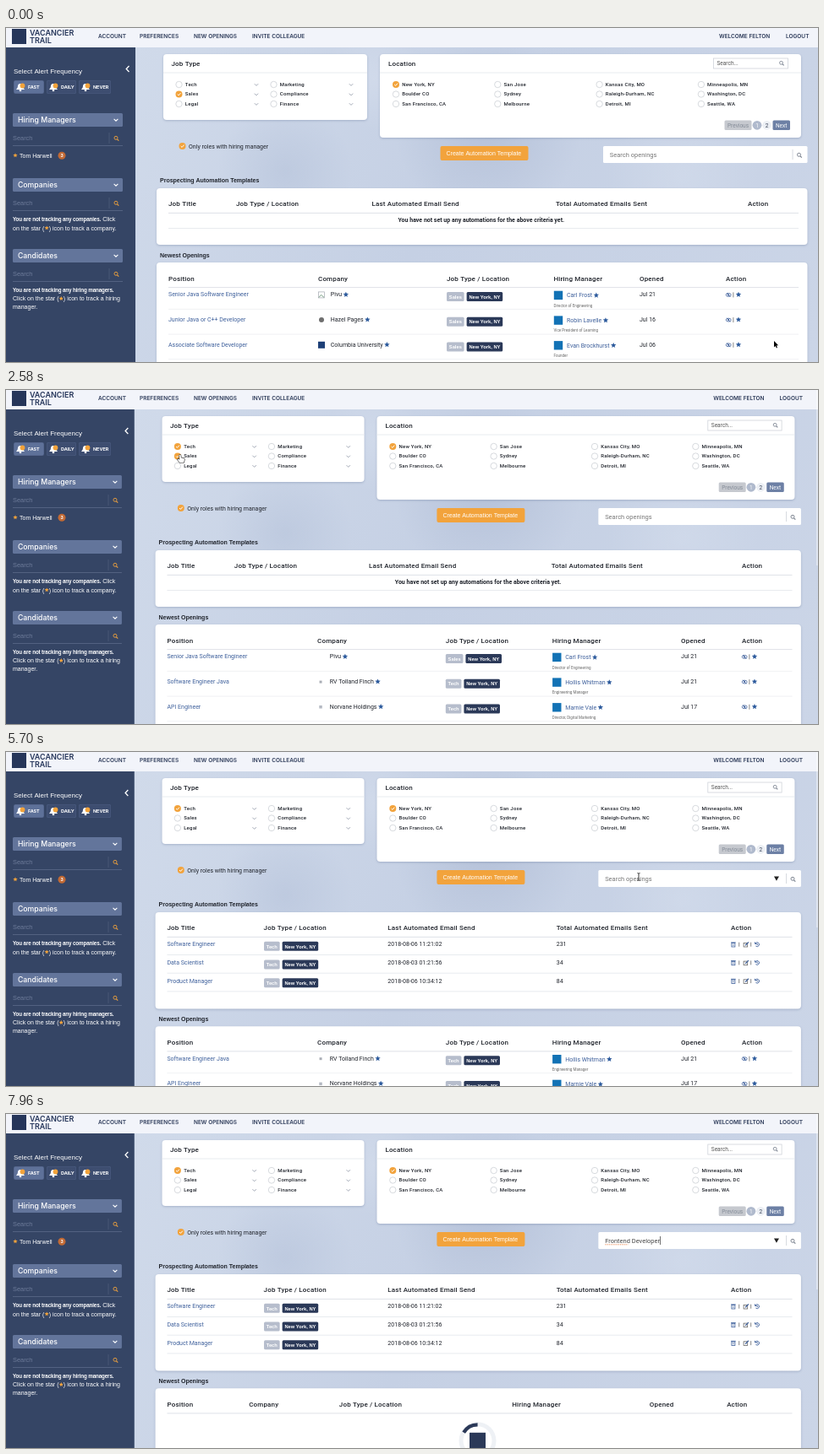
Write an HTML page with a canvas that moves like this. It is 960 px wide and 396 px high and loops after 8 s.

```html
<!DOCTYPE html>
<html lang="en">
<head>
<meta charset="utf-8">
<title>Openings dashboard</title>
<style>
html, body { margin: 0; width: 100%; height: 100%; overflow: hidden; background: #c8d3e6; }
canvas { display: block; width: 100vw; height: 100vh; }
</style>
</head>
<body>
<canvas id="stage"></canvas>
<script>
const W = 960, H = 396, LOOP = 8000;
const canvas = document.getElementById('stage');
const ctx = canvas.getContext('2d');

const NAVY = '#2b3958', LINK = '#3d5f9b', STAR = '#2c5a9c', ORANGE = '#f2a33c', INK = '#20242c', RULE = '#e3e6eb';
const ROBOTO = 'Roboto, sans-serif', ARIAL = '"Liberation Sans", Arial, sans-serif', INTER = 'Inter, sans-serif';
const F = {
  nav: `600 6.5px ${INTER}`, brand: `600 9px ${INTER}`, bar: `500 8.7px ${INTER}`, alert: `700 5.4px ${INTER}`,
  side: `7px ${ARIAL}`, sideBold: `bold 6.3px ${ARIAL}`, sideTitle: `8px ${ARIAL}`, sideSearch: `7.4px ${ARIAL}`,
  section: `bold 7px ${ARIAL}`, badge: `bold 5.75px ${ARIAL}`, button: `7px ${ARIAL}`,
  head: `500 8px ${ROBOTO}`, cell: `7px ${ROBOTO}`, bold: `700 7px ${ROBOTO}`, option: `500 6px ${ROBOTO}`,
  small: `4.5px ${ROBOTO}`, input: `7.5px ${ROBOTO}`, page: `6.5px ${ROBOTO}`, list: `700 6.7px ${INTER}`
};
const SPACING = { head: 0.17, option: 0.2, sideBold: -0.15 };

// Times of the hard changes, in ms
const AT = {
  press: 1880, tech: 2040, load1: 2150, rows1: 2370, noSales: 2690, load2: 2800, rows2: 3010,
  hover: 5250, focus: 5900, keyF: 6620, keyR: 6740, pick: 7320
};

const OPENINGS = {
  pivu: ['Senior Java Software Engineer', 'Pivu', 'Sales', 'Carl Frost', 'Director of Engineering', 'Jul 21'],
  pages: ['Junior Java or C++ Developer', 'Hazel Pages', 'Sales', 'Robin Lavelle', 'Vice President of Learning', 'Jul 16'],
  columbia: ['Associate Software Developer', 'Columbia University', 'Sales', 'Evan Brockhurst', 'Founder', 'Jul 06'],
  finch: ['Software Engineer Java', 'RV Tolland Finch', 'Tech', 'Hollis Whitman', 'Engineering Manager', 'Jul 21'],
  norvane: ['API Engineer', 'Norvane Holdings', 'Tech', 'Marnie Vale', 'Director, Digital Marketing', 'Jul 17']
};
const MARKS = { pages: [4, 6, '#6e6e6e', true], columbia: [4, 8, '#1d3f77'], finch: [4, 3, '#a9adb5'], norvane: [4, 3.5, '#b4b9c2'] };
const TEMPLATES = [
  ['Software Engineer', '2018-08-06 11:21:02', '231'],
  ['Data Scientist', '2018-08-03 01:21:56', '34'],
  ['Product Manager', '2018-08-06 10:34:12', '84']
];

let scale = 1;
const X = x => x * scale;

function text(s, x, y, font, color = INK) {
  ctx.font = F[font];
  ctx.letterSpacing = (SPACING[font] || 0) + 'px';
  ctx.fillStyle = color;
  ctx.fillText(s, x, y);
  return x + ctx.measureText(s).width;
}
function box(x, y, w, h, color, r = 0) {
  ctx.fillStyle = color;
  ctx.beginPath();
  ctx.roundRect(x, y, w, h, r);
  ctx.fill();
}
function disc(x, y, r, color) {
  ctx.fillStyle = color;
  ctx.beginPath();
  ctx.arc(x, y, r, 0, 7);
  ctx.fill();
}
function path(points, color, width = 1) {
  ctx.strokeStyle = color;
  ctx.lineWidth = width;
  ctx.beginPath();
  points.forEach(([x, y], i) => i ? ctx.lineTo(x, y) : ctx.moveTo(x, y));
  ctx.stroke();
}
function ring(x, y, r, color, width = 1, from = 0, to = Math.PI * 2) {
  ctx.strokeStyle = color;
  ctx.lineWidth = width;
  ctx.beginPath();
  ctx.arc(x, y, r, from, to);
  ctx.stroke();
}
function rule(x1, x2, y, color = RULE) { path([[x1, y], [x2, y]], color, 0.8); }
function chevron(x, y, color, s = 2.2, w = 0.9) { path([[x - s, y - s / 2], [x, y + s / 2], [x + s, y - s / 2]], color, w); }
function lens(x, y, color, r = 2) {
  ring(x - 0.5, y - 0.5, r, color, 0.9);
  path([[x + r * 0.5, y + r * 0.5], [x + r * 1.4, y + r * 1.4]], color, 1.1);
}
function star(x, y, r, color) {
  ctx.fillStyle = color;
  ctx.beginPath();
  for (let i = 0; i < 10; i++) {
    const a = -Math.PI / 2 + i * Math.PI / 5, d = i % 2 ? r * 0.45 : r;
    ctx.lineTo(x + d * Math.cos(a), y + d * Math.sin(a));
  }
  ctx.fill();
}
function card(x1, y1, x2, y2) {
  ctx.save();
  ctx.shadowColor = 'rgba(60,80,120,.28)';
  ctx.shadowBlur = 3;
  ctx.shadowOffsetY = 1;
  box(X(x1), y1, X(x2) - X(x1), y2 - y1, '#fff', 4);
  ctx.restore();
}
function check(x, y, state) {
  if (state === 'on') {
    disc(x, y, 4, ORANGE);
    path([[x - 1.8, y], [x - 0.4, y + 1.4], [x + 2, y - 1.4]], '#fff', 1);
  } else {
    disc(x, y, 3.7, state === 'down' ? '#d3d3d3' : '#fff');
    ring(x, y, 3.7, '#c6cad0', 0.7);
  }
}
function badge(s, x, y, color) {
  ctx.font = F.badge;
  ctx.letterSpacing = '0px';
  const w = ctx.measureText(s).width + 5.6;
  box(x, y, w, 11, color, 1.5);
  text(s, x + 2.8, y + 7.7, 'badge', '#fff');
  return x + w;
}
function badges(kind, x, y) { badge('New York, NY', badge(kind, x, y, '#b6bdcc') + 3, y, NAVY); }

function background() {
  const g = ctx.createLinearGradient(150, 20, 960, 396);
  g.addColorStop(0, '#d0daea');
  g.addColorStop(0.45, '#c5d0e4');
  g.addColorStop(1, '#cbd5e7');
  ctx.fillStyle = g;
  ctx.fillRect(0, 0, W, H);
  const blobs = [[570, 120, 110, '150,165,195'], [330, 170, 80, '165,180,208'], [435, 60, 60, '225,232,243'], [800, 175, 90, '222,230,242']];
  for (const [x, y, r, c] of blobs) {
    const b = ctx.createRadialGradient(x, y, 0, x, y, r);
    b.addColorStop(0, `rgba(${c},.32)`);
    b.addColorStop(1, `rgba(${c},0)`);
    ctx.fillStyle = b;
    ctx.fillRect(x - r, y - r, 2 * r, 2 * r);
  }
}

function header() {
  box(0, 0, W, 23, '#f2f4fa');
  box(7, 1, 17, 18, '#26365a');
  text('VACANCIER', 28, 9.4, 'brand', '#26365a');
  text('TRAIL', 28, 18, 'brand', '#26365a');
  [['ACCOUNT', 109], ['PREFERENCES', 158], ['NEW OPENINGS', 222], ['INVITE COLLEAGUE', 291]].forEach(([s, x]) => text(s, x, 12, 'nav', NAVY));
  text('WELCOME FELTON', X(843), 12, 'nav', NAVY);
  text('LOGOUT', X(922), 12, 'nav', NAVY);
}

function bell(x, y) {
  ctx.fillStyle = '#fff';
  ctx.beginPath();
  ctx.moveTo(x - 5, y + 3);
  ctx.quadraticCurveTo(x - 3, y + 1, x - 3, y - 1);
  ctx.arc(x, y - 1, 3, Math.PI, 0);
  ctx.quadraticCurveTo(x + 3, y + 1, x + 5, y + 3);
  ctx.fill();
  disc(x, y + 4, 1.3, '#fff');
  disc(x + 2.5, y - 1.5, 2.9, ORANGE);
}

function filterGroup(title, y) {
  box(8, y, X(138) - 8, 16, '#63759b', 1.5);
  text(title, 14, y + 11.2, 'bar', '#fff');
  chevron(X(130), y + 8, '#fff', 2.4, 1.1);
  text('Search', 8, y + 32, 'sideSearch', '#6e7c9a');
  path([[X(122), y + 23], [X(122), y + 36]], '#52617f', 0.7);
  lens(X(130.5), y + 29.8, ORANGE, 2);
  rule(8, X(138), y + 38.5, '#5b6a88');
}

function starNote(before, after, y) {
  const x = text(before, 8, y, 'side', '#fff');
  star(x + 2.8, y - 2.4, 2.7, ORANGE);
  text(after, x + 5.4, y, 'side', '#fff');
}

function sidebar() {
  box(0, 23, X(153), H, '#354565');
  text('Select Alert Frequency', 9, 53.5, 'sideTitle', '#fff');
  path([[X(145.5), 45], [X(142.2), 48.5], [X(145.5), 52]], '#fff', 1.3);
  [['FAST', 9, 36, '#5e7199'], ['DAILY', 48, 35, '#3d4d70'], ['NEVER', 86, 38, '#3d4d70']].forEach(([s, x, w, c]) => {
    box(x, 62, w, 16, '#4c5d82', 2);
    box(x + 0.5, 62.5, w - 1, 15, c, 2);
    bell(x + 8, 70);
    text(s, x + 17, 72, 'alert', '#fff');
  });
  filterGroup('Hiring Managers', 101);
  star(11, 151, 2.8, ORANGE);
  text('Tom Harwell', 16, 153.5, 'side', '#fff');
  disc(66, 151.3, 4.5, '#c26a35');
  text('3', 64.5, 153.4, 'badge', '#fff');

  filterGroup('Companies', 178);
  const x = text('You are not tracking any companies.', 8, 229.3, 'sideBold', '#fff');
  text('Click', x + 2, 229.3, 'side', '#fff');
  starNote('on the star (', ') icon to track a company.', 239.5);

  filterGroup('Candidates', 262);
  text('You are not tracking any hiring managers.', 8, 313, 'sideBold', '#fff');
  starNote('Click on the star (', ') icon to track a hiring', 323.2);
  text('manager.', 8, 333, 'side', '#fff');
}

function jobTypes(t) {
  card(186, 31, 427, 109);
  text('Job Type', X(195.5), 44.8, 'head');
  rule(X(186), X(427), 53);
  const tech = t >= AT.tech ? 'on' : t >= AT.press ? 'down' : 'off';
  const sales = t < AT.noSales ? 'on' : 'off';
  const cols = [[204.5, [['Tech', tech], ['Sales', sales], ['Legal', 'off']]], [316.5, [['Marketing'], ['Compliance'], ['Finance']]]];
  for (const [x, items] of cols) items.forEach(([s, state], i) => {
    const y = 67 + i * 11.5;
    check(X(x), y, state);
    text(s, X(x) + 7.3, y + 1.9, 'option');
    chevron(X(x + 91.5), y + 0.3, '#8d96a5', 2.2, 0.8);
  });
}

function locations() {
  card(442, 31, 940, 130);
  text('Location', X(452), 44.8, 'head');
  rule(X(442), X(940), 53);
  ctx.strokeStyle = '#cfd3da';
  ctx.lineWidth = 0.8;
  ctx.strokeRect(X(836.5), 36, X(924.5) - X(836.5), 12);
  text('Search...', X(840.5), 44.3, 'page', '#555');
  lens(X(917), 41.8, '#7e8694', 1.9);
  const cities = ['New York, NY', 'Boulder CO', 'San Francisco, CA', 'San Jose', 'Sydney', 'Melbourne',
    'Kansas City, MO', 'Raleigh-Durham, NC', 'Detroit, MI', 'Minneapolis, MN', 'Washington, DC', 'Seattle, WA'];
  cities.forEach((s, i) => {
    const x = X(461 + Math.floor(i / 3) * 120.3), y = 67 + (i % 3) * 11.5;
    check(x, y, i ? 'off' : 'on');
    text(s, x + 7.2, y + 1.9, 'option');
  });
  box(X(849.5), 109.5, 32, 11.5, '#c6c9cf', 1.5);
  text('Previous', X(849.5) + 3.5, 117.6, 'page', '#858c98');
  disc(X(888), 115.3, 5.4, '#b0bacd');
  text('1', X(888) - 1.8, 117.6, 'page', '#fff');
  disc(X(899.5), 115.3, 5.2, '#eceff4');
  text('2', X(899.5) - 1.8, 117.6, 'page', '#3d475c');
  box(X(906.5), 109.5, 20.5, 11.5, '#6d80a5', 1.5);
  text('Next', X(906.5) + 3.4, 117.6, 'page', '#fff');
}

function toolbar(t) {
  check(X(208.5), 140, 'on');
  text('Only roles with hiring manager', X(216), 142.8, 'cell');
  box(X(513.5), 140, 104, 17, ORANGE, 2);
  text('Create Automation Template', X(513.5) + 7, 151, 'button', '#fff');

  const x = X(706), right = X(947.5), typed = t >= AT.pick ? 'Frontend Developer' : t >= AT.keyR ? 'Fr' : t >= AT.keyF ? 'F' : '';
  box(x, 140, right - x, 20, '#fff', 1.5);
  const end = text(typed || 'Search openings', x + 7.8, 152.6, 'input', typed ? '#474747' : '#777');
  path([[X(930), 144], [X(930), 156]], '#ccd1d9', 0.8);
  lens(X(938), 150.8, '#737b88', 2);
  if (t >= AT.hover) {
    const a = X(918.3);
    ctx.fillStyle = '#222';
    ctx.beginPath();
    ctx.moveTo(a - 3, 147.4);
    ctx.lineTo(a + 3, 147.4);
    ctx.lineTo(a, 152.8);
    ctx.fill();
  }
  const blink = Math.floor((t - AT.focus) / 530) % 2 === 0;
  if (typed || (t >= AT.focus && blink)) {
    const c = typed ? end + 0.5 : x + 7.5;
    path([[c, 145], [c, 155]], '#333', 0.7);
  }
  if (t >= AT.pick) {
    ctx.setLineDash([1.2, 1]);
    path([[x + 8, 154.8], [x + 35, 154.8]], '#e98a55', 1);
    ctx.setLineDash([]);
  }
}

function suggestions() {
  box(701.5, 159.5, 222, 13.5, '#555c66');
  box(702.3, 160.2, 220.4, 12, '#fff');
  text('Frontend Developer', 707, 168.4, 'list', '#000');
}

function heads(names, xs, y) {
  names.forEach((s, i) => text(s, X(xs[i]), y, 'head'));
  rule(X(192), X(937), y + 8, '#d6dae1');
}

function eye(x, y) {
  ctx.strokeStyle = LINK;
  ctx.lineWidth = 0.8;
  ctx.beginPath();
  ctx.ellipse(x, y, 3, 1.9, 0, 0, 7);
  ctx.stroke();
  disc(x, y, 1, LINK);
  path([[x - 2, y - 2.4], [x + 2, y + 2.4]], LINK, 0.8);
}
function templateActions(x, y) {
  ctx.strokeStyle = LINK;
  ctx.lineWidth = 0.8;
  ctx.strokeRect(x + 0.8, y - 1.6, 4, 4.4);
  path([[x, y - 2.3], [x + 5.6, y - 2.3]], LINK, 0.9);
  path([[x + 2.8, y - 0.6], [x + 2.8, y + 1.8]], LINK, 0.7);
  path([[x + 9.6, y - 2.5], [x + 9.6, y + 2.5]], '#555', 0.7);
  ctx.strokeRect(x + 15, y - 1.8, 4.6, 4.6);
  path([[x + 17, y + 1], [x + 20.8, y - 2.8]], LINK, 1.3);
  path([[x + 23.6, y - 2.5], [x + 23.6, y + 2.5]], '#555', 0.7);
  ring(x + 31, y, 2.4, LINK, 0.9, -2.6, 2.4);
  path([[x + 28.2, y - 2.8], [x + 28.6, y - 0.6], [x + 30.8, y - 1]], LINK, 0.9);
  path([[x + 31, y - 1.2], [x + 31, y + 0.4], [x + 32.2, y + 0.4]], LINK, 0.7);
}

function templates(filled) {
  text('Prospecting Automation Templates', X(182), 183.4, 'section');
  card(178, 190, 947.5, filled ? 304.5 : 257);
  const names = ['Job Title', 'Job Type / Location', 'Last Automated Email Send', 'Total Automated Emails Sent', 'Action'];
  heads(names, filled ? [192, 307, 455, 656, 864] : [192, 272, 432.5, 650, 877], 211.4);
  if (!filled) {
    text('You have not set up any automations for the above criteria yet.', X(463.5), 230.3, 'bold');
    rule(X(192), X(937), 237.5);
    return;
  }
  TEMPLATES.forEach(([title, sent, total], i) => {
    const y = 230.2 + i * 21.7;
    text(title, X(192), y, 'cell', LINK);
    badges('Tech', X(307.5), y - 5.4);
    text(sent, X(455), y, 'cell');
    text(total, X(656), y, 'cell');
    templateActions(X(864), y - 2);
    rule(X(192), X(937), y + 10.3);
  });
}

function opening(key, xs, y) {
  const [title, company, kind, manager, role, date] = OPENINGS[key];
  const [x0, x1, x2, x3, x4, x5] = xs.map(X);
  text(title, x0, y, 'cell', LINK);
  const mark = MARKS[key];
  if (mark) {
    const [dx, size, color, round] = mark;
    if (round) disc(x1 + dx, y - 2, size / 2, color);
    else box(x1 + dx - size / 2, y - 2 - size / 2, size, size, color);
  } else if (scale === 1) {
    ctx.strokeStyle = '#a4a9b1';
    ctx.lineWidth = 0.7;
    ctx.strokeRect(x1 + 0.5, y - 5.5, 7, 7);
    path([[x1 + 1, y + 1], [x1 + 3.5, y - 2], [x1 + 7, y + 1]], '#78a084', 1);
  }
  star(text(company, x1 + 14.8, y, 'cell') + 4.7, y - 2.3, 3.4, STAR);
  badges(kind, x2, y - 5.4);
  box(x3 + 0.3, y - 6.7, 10.4, 10.4, '#1272b5');
  star(text(manager, x3 + 15.5, y + 0.8, 'cell', LINK) + 4.7, y - 1.5, 3.4, STAR);
  text(role, x3, y + 12.3, 'small', '#666');
  text(date, x4, y, 'cell');
  eye(x5 + 3.2, y - 2);
  path([[x5 + 8.9, y - 5], [x5 + 8.9, y + 1]], '#555', 0.7);
  star(x5 + 15, y - 2.3, 3.4, STAR);
  rule(x0, X(937), y + 15, '#eceef2');
}

function spinner(x, y, t) {
  disc(x, y, 22, '#eef1f5');
  disc(x, y, 17, '#fff');
  const mid = -Math.PI / 2 + (t - 6890) / 1167 * Math.PI * 2;
  ring(x, y, 19, NAVY, 4.2, mid - 0.52, mid + 0.52);
  box(x - 9.5, y - 9.5, 19, 19, NAVY);
}

function openings(dy, keys, xs, t) {
  text('Newest Openings', X(182), 271.6 + dy, 'section');
  card(178, 278 + dy, 947.5, keys ? 430 : 430);
  heads(['Position', 'Company', 'Job Type / Location', 'Hiring Manager', 'Opened', 'Action'], xs, 299.6 + dy);
  if (keys) keys.forEach((key, i) => opening(key, xs, 318.4 + dy + i * 29.7));
  else spinner(X(562), 340 + dy, t);
}

// Pointer stops: time, x, y
const STOPS = [[0, 908, 371], [1000, 908, 371], [1780, 211, 68], [2150, 211, 68], [2500, 206, 77], [2760, 206, 77],
  [3250, 449, 57], [4350, 449, 57], [5400, 748, 148], [LOOP, 748, 148]];

function pointer(t) {
  if (t >= AT.keyF) return;
  const i = STOPS.findIndex(s => s[0] > t);
  const [ta, xa, ya] = STOPS[i - 1], [tb, xb, yb] = STOPS[i];
  const u = (t - ta) / (tb - ta), e = u * u * (3 - 2 * u);
  const x = xa + (xb - xa) * e, y = ya + (yb - ya) * e;
  ctx.save();
  ctx.translate(x, y);
  ctx.lineJoin = 'round';
  if (x > 702 && y > 139 && y < 161) {
    path([[-1.6, -4.5], [0, -4], [1.6, -4.5]], '#222', 0.8);
    path([[0, -4], [0, 4]], '#222', 0.9);
    path([[-1.6, 4.5], [0, 4], [1.6, 4.5]], '#222', 0.8);
  } else {
    const hand = x > 195 && x < 240 && y > 60 && y < 96;
    const shape = hand
      ? [[-0.9, 0], [0.6, 0], [0.9, 3.2], [4.4, 4], [5, 5.5], [4.2, 9], [-0.6, 9], [-3.4, 5.4], [-2.6, 4.6], [-0.8, 5.8]]
      : [[0, 0], [0, 7.4], [1.7, 5.9], [2.9, 8.6], [4, 8.1], [2.9, 5.5], [5.1, 5.3]];
    ctx.beginPath();
    shape.forEach(p => ctx.lineTo(...p));
    ctx.closePath();
    ctx.strokeStyle = hand ? '#222' : '#fff';
    ctx.lineWidth = hand ? 1.2 : 1;
    ctx.stroke();
    ctx.fillStyle = hand ? '#fff' : '#000';
    ctx.fill();
  }
  ctx.restore();
}

function draw(t) {
  const narrow = t >= AT.load1, filled = t >= AT.rows2;
  scale = narrow ? 0.992 : 1;
  background();
  header();
  sidebar();
  jobTypes(t);
  locations();
  toolbar(t);
  templates(filled);

  const loading = (narrow && t < AT.rows1) || (t >= AT.load2 && !filled) || t >= AT.keyR;
  const wide = [192, 371, 524, 651, 804.5, 877];
  const dy = filled ? 47.3 : 0;
  if (loading) openings(dy, null, [192, 289.5, 397, 603, 767, 859], t);
  else if (filled) openings(dy, ['finch', 'norvane'], wide, t);
  else if (narrow) openings(dy, ['pivu', 'finch', 'norvane'], wide, t);
  else openings(dy, ['pivu', 'pages', 'columbia'], [192, 369, 521, 647.5, 749, 851], t);

  if (narrow) box(958.3, 0, 1.2, 208, 'rgba(255,255,255,.65)');
  if (t >= AT.keyR && t < AT.pick) suggestions();
  pointer(t);
}

function frame() {
  const dpr = window.devicePixelRatio || 1;
  if (canvas.width !== W * dpr) {
    canvas.width = W * dpr;
    canvas.height = H * dpr;
  }
  ctx.setTransform(dpr, 0, 0, dpr, 0, 0);
  draw(performance.now() % LOOP);
  requestAnimationFrame(frame);
}
frame();
</script>
</body>
</html>
```
